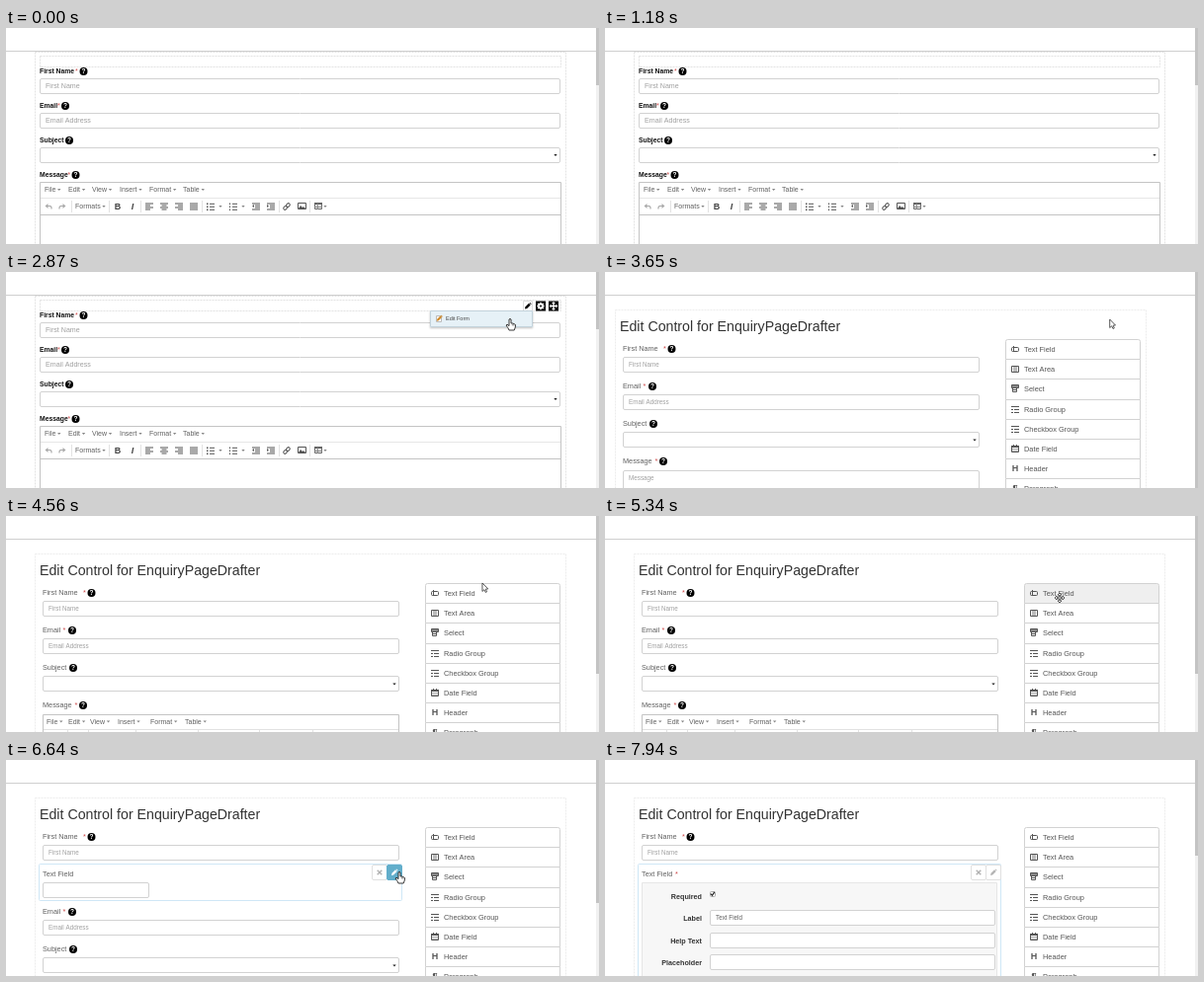
Write an HTML page with a canvas that moves like this. It is 600 px wide and 219 px high and loops after 8 s.

```html
<!DOCTYPE html>
<html lang="en">
<head>
<meta charset="utf-8">
<title>Form editor</title>
<style>
html, body { margin: 0; width: 100%; height: 100%; overflow: hidden; background: #fff; }
canvas { display: block; width: 600px; height: 219px; }
</style>
</head>
<body>
<canvas id="stage" width="600" height="219"></canvas>
<script>
const ctx = document.getElementById('stage').getContext('2d');
const LOOP = 8000, STEP = 130;
const FONT = '"Liberation Sans", Arial, sans-serif';
const TEXT = '#606060', HINT = '#a0a0a0', EDGE = '#d2d2d2', RED = '#c44';

// Moments at which the interface changes state.
const AT = {
  tools: 1430, menu: 2340, editor: 3250, settled: 4030, grab: 4820,
  drag: 5440, drop: 5860, hover: 6370, panel: 6760, checked: 7540, leave: 7670
};
// Pointer path: time, x, y.
const PATH = [
  [1300, 470, 120], [1950, 533, 34], [2150, 533, 34], [2340, 529, 36],
  [2730, 510, 48], [4150, 511, 48], [4900, 460, 83], [5400, 460, 83],
  [5860, 200, 112], [5990, 200, 112], [6500, 398, 114], [6850, 398, 114],
  [7450, 108, 135], [7670, 108, 135]
];

function text(str, x, y, size, color = TEXT, weight = 'normal', align = 'left') {
  ctx.font = `${weight} ${size}px ${FONT}`;
  ctx.textAlign = align;
  ctx.textBaseline = 'alphabetic';
  ctx.fillStyle = color;
  ctx.fillText(str, x, y + size * 0.35);
}

function fill(x, y, w, h, color) {
  ctx.fillStyle = color;
  ctx.fillRect(x, y, w, h);
}

function box(x, y, w, h, stroke = EDGE, back = '#fff', radius = 1.5) {
  ctx.beginPath();
  ctx.roundRect(x + 0.5, y + 0.5, w, h, radius);
  if (back) { ctx.fillStyle = back; ctx.fill(); }
  ctx.strokeStyle = stroke;
  ctx.lineWidth = 1;
  ctx.stroke();
}

function trace(points) {
  ctx.beginPath();
  points.forEach(([x, y], i) => i ? ctx.lineTo(x, y) : ctx.moveTo(x, y));
}

function line(points, color = '#555', width = 1) {
  trace(points);
  ctx.strokeStyle = color;
  ctx.lineWidth = width;
  ctx.stroke();
}

function shape(points, color, outline) {
  trace(points);
  ctx.closePath();
  ctx.fillStyle = color;
  ctx.fill();
  if (outline) {
    ctx.strokeStyle = outline;
    ctx.lineWidth = 0.9;
    ctx.stroke();
  }
}

function at(x, y, draw) {
  ctx.save();
  ctx.translate(x, y);
  draw();
  ctx.restore();
}

function dashed(x, y, w, h, color) {
  ctx.save();
  ctx.setLineDash([2, 1]);
  ctx.strokeStyle = color;
  ctx.lineWidth = 1;
  ctx.strokeRect(x + 0.5, y + 0.5, w, h);
  ctx.restore();
}

function help(x, y) {
  ctx.beginPath();
  ctx.arc(x, y, 4, 0, Math.PI * 2);
  ctx.fillStyle = '#000';
  ctx.fill();
  text('?', x, y, 6.5, '#fff', 'bold', 'center');
}

function caret(x, y, color = '#888') {
  shape([[x - 1.7, y - 1], [x + 1.7, y - 1], [x, y + 1]], color);
}

function pencil(x, y, color, s = 1) {
  at(x, y, () => {
    ctx.scale(s, s);
    shape([[-3, 3], [-2.5, 0.8], [1, -2.7], [2.7, -1], [-0.8, 2.5]], color);
    shape([[1.5, -3.1], [2.2, -3.6], [3.6, -2.2], [3.1, -1.5]], color);
  });
}

function cross(x, y, color) {
  line([[x - 2.3, y - 2.3], [x + 2.3, y + 2.3]], color, 1.4);
  line([[x + 2.3, y - 2.3], [x - 2.3, y + 2.3]], color, 1.4);
}

function fourArrows(color, r, outline) {
  for (let i = 0; i < 4; i++) {
    ctx.save();
    ctx.rotate(i * Math.PI / 2);
    shape([[-0.7, 0], [-0.7, 2 - r], [-2, 2 - r], [0, -r], [2, 2 - r], [0.7, 2 - r], [0.7, 0]], color, outline);
    ctx.restore();
  }
}

function gear() {
  for (let i = 0; i < 4; i++) {
    ctx.rotate(Math.PI / 4);
    fill(-0.8, -3.7, 1.6, 7.4, '#fff');
  }
  ctx.beginPath();
  ctx.arc(0, 0, 2.7, 0, Math.PI * 2);
  ctx.fill();
  ctx.beginPath();
  ctx.arc(0, 0, 1.1, 0, Math.PI * 2);
  ctx.fillStyle = '#000';
  ctx.fill();
}

function stripes(x, y, widths, align = 0, color = '#555') {
  const widest = Math.max(...widths);
  widths.forEach((w, i) =>
    fill(x - widest / 2 + (widest - w) * align, y - 3.5 + i * 2, w, 1, color));
}

function menuBar(y, xs) {
  ['File', 'Edit', 'View', 'Insert', 'Format', 'Table'].forEach((name, i) => {
    text(name, xs[i], y, 7);
    caret(xs[i] + ctx.measureText(name).width + 3.5, y);
  });
}

function toolbar(y) {
  for (const [x, dir] of [[43, 1], [57, -1]]) {
    at(x, y, () => {
      ctx.scale(dir, 1);
      shape([[-3.5, -0.5], [-0.5, -3], [-0.5, 2]], '#aaa');
      line([[-1, -0.5], [2, -0.5], [3, 1], [3, 2.5]], '#aaa', 1.2);
    });
  }
  for (const x of [66, 104, 136, 198, 276, 307]) fill(x, y - 6, 1, 12, '#e2e2e2');
  text('Formats', 70, y, 7);
  [99, 217, 240, 323].forEach(x => caret(x, y));
  text('B', 113, y, 9, '#444', 'bold', 'center');
  text('I', 128, y, 9, '#444', 'italic bold', 'center');
  [0, 0.5, 1].forEach((align, i) => stripes(145 + i * 15, y, [8, 5, 8, 5], align));
  stripes(190, y, [8, 8, 8, 8]);
  for (const x of [207, 230]) {
    for (let i = 0; i < 3; i++) {
      fill(x - 4, y - 3.5 + i * 3, x === 207 ? 1.5 : 1, 1.6, '#555');
      fill(x - 1, y - 3.2 + i * 3, 5, 1, '#555');
    }
  }
  [[253, -1], [268, 1]].forEach(([x, dir]) => {
    stripes(x, y, [8, 5, 5, 8], 1);
    shape([[x - 3 - dir, y - 2], [x - 3 + dir, y - 0.5], [x - 3 - dir, y + 1]], '#555');
  });
  at(284, y, () => {
    ctx.rotate(-Math.PI / 4);
    ctx.strokeStyle = '#555';
    ctx.lineWidth = 1;
    for (const x of [-4, 0]) {
      ctx.beginPath();
      ctx.roundRect(x, -1.5, 4, 3, 1.4);
      ctx.stroke();
    }
  });
  box(295, y - 4, 8, 6, '#555', null, 0);
  shape([[296, y + 2], [298, y - 1], [300, y + 1], [301, y], [303, y + 2]], '#555');
  box(312, y - 4, 7, 6, '#666', null, 0);
  fill(312, y - 4, 8, 2, '#666');
  fill(312, y, 8, 1, '#888');
  fill(315, y - 3, 1, 6, '#888');
}

function frame(t) {
  fill(0, 0, 600, 219, '#fff');
  fill(0, 23, 597, 1, '#cfcfcf');
  fill(597, 0, 3, 219, '#f1f1f1');
  // The thumb shrinks as the page grows.
  const thumb = t < AT.editor ? 58 : t < AT.settled ? 219 : t < AT.drop ? 160 : t < AT.panel ? 145 : 97;
  fill(597, 0, 3, thumb, '#c4c4c4');
}

function viewPage(t) {
  dashed(29, 24, 537, 220, '#e2e2e2');
  dashed(34, 28, 527, 11, '#e2e2e2');
  const fields = [
    ['First Name', 44, 70, 78.5, '*', 'First Name'],
    ['Email', 79, 52, 60, '*', 'Email Address'],
    ['Subject', 114, 0, 64, '', ''],
    ['Message', 149, 62.5, 70.5, '*', null]
  ];
  for (const [label, y, starX, helpX, star, hint] of fields) {
    text(label, 34, y, 6.8, '#111', 'bold');
    text(star, starX, y, 6.8, RED);
    help(helpX, y);
    if (hint === null) continue;
    box(34, y + 7, 526, 15);
    text(hint, 40, y + 15, 7.1, HINT);
  }
  caret(556, 129, '#222');
  box(34, 156, 527, 90, '#c4c4c4', '#fff', 0);
  fill(35, 172, 526, 1, '#e6e6e6');
  fill(35, 189, 526, 1, '#c4c4c4');
  menuBar(164, [39, 63, 87, 115, 145, 179]);
  toolbar(181);

  if (t >= AT.tools) {
    box(523, 29, 9, 10, '#ddd', '#fff', 0);
    pencil(528, 34.5, '#000');
    fill(536, 29.5, 10, 10, '#000');
    at(541, 34.5, gear);
    fill(549, 29.5, 10, 10, '#000');
    at(554, 34.5, () => fourArrows('#fff', 4.4));
  }
  if (t >= AT.menu) {
    ctx.save();
    ctx.shadowColor = 'rgba(0,0,0,.25)';
    ctx.shadowBlur = 2;
    ctx.shadowOffsetY = 1;
    fill(429, 39, 104, 17, '#e6f1f7');
    ctx.restore();
    box(429, 39, 103, 16, '#c3d3dc', '#e6f1f7', 0);
    box(435, 44, 5, 6, '#bbb', '#fff', 0);
    pencil(438.5, 47, '#d08a28', 0.9);
    text('Edit Form', 445, 47.2, 5.5, '#444');
  }
}

function sideIcon(kind, x, y) {
  const c = '#555';
  if (kind === 0) {
    box(x - 4, y - 2, 7, 4, c, null, 1);
    fill(x - 2, y - 3, 1, 6, c);
  } else if (kind === 1) {
    box(x - 4, y - 3, 7, 6, c, null, 0);
    [-1, 1, 3].forEach(d => fill(x - 2, y + d - 0.4, 4, 0.8, c));
  } else if (kind === 2) {
    box(x - 4, y - 4, 7, 3, c, '#888', 0);
    box(x - 3, y - 1, 4, 4, c, null, 0);
    fill(x - 2, y + 1, 3, 1, c);
  } else if (kind < 5) {
    [-3, 0, 3].forEach((d, i) => {
      fill(x - 4, y + d, 2, 1, c);
      fill(x - (i ? 1 : 2), y + d, i ? 5 : 6, 1, c);
    });
  } else if (kind === 5) {
    box(x - 4, y - 3, 7, 6, c, null, 0);
    fill(x - 4, y - 3, 8, 2, c);
    fill(x - 2, y - 4, 1, 2, c);
    fill(x + 1, y - 4, 1, 2, c);
    for (let i = 0; i < 6; i++) fill(x - 2.5 + i % 3 * 2, y + (i > 2 ? 1.8 : 0), 1, 1, c);
  } else {
    text(kind === 6 ? 'H' : '¶', x, y, 9, c, 'bold', 'center');
  }
}

const ITEMS = ['Text Field', 'Text Area', 'Select', 'Radio Group',
  'Checkbox Group', 'Date Field', 'Header', 'Paragraph'];
const itemTop = i => Math.round(68 + i * 20.2);

function sidebarItem(i, x, y, back = '#fff') {
  box(x, y, 136, itemTop(i + 1) - itemTop(i), EDGE, back, i ? 0 : [2, 2, 0, 0]);
  sideIcon(i, x + 10, y + 10);
  text(ITEMS[i], x + 19, y + 10.2, 7.4, '#555');
}

function fieldLabel(label, y, starX, helpX) {
  text(label, 37, y, 7.3);
  if (starX) text('*', starX, y, 7.3, RED);
  help(helpX, y + 0.5);
}

function input(x, y, w, hint = '', color = HINT) {
  box(x, y, w, 15);
  text(hint, x + 6, y + 8.2, 6.3, color);
}

function fieldBlock(t) {
  const open = t >= AT.panel;
  box(33, 105, 367, open ? 140 : 37, '#cfe7f6', '#fff', 1);
  text('Text Field', 37, 115, 7.3);
  if (t >= AT.checked) text('*', 71, 115, 7.3, RED);
  const hot = t >= AT.hover && t < AT.panel + STEP;
  box(370, 106, 15, 15, '#e0e0e0');
  cross(378, 114, '#b0b0b0');
  box(385, 106, 15, 15, hot ? '#62aecb' : '#e0e0e0', hot ? '#62aecb' : '#fff');
  pencil(393, 114, hot ? '#fff' : '#b5b5b5');
  if (!open) {
    input(37, 124, 107);
    return;
  }
  box(37, 124, 359, 110, '#e6e6e6', '#f7f7f7', 0);
  [['Required', 138], ['Label', 160], ['Help Text', 183], ['Placeholder', 205.5]].forEach(([name, y], i) => {
    text(name, 98, y, 7.2, '#333', 'bold', 'right');
    if (i) input(106, Math.round(y - 8.5), 288, i === 1 ? 'Text Field' : '', TEXT);
  });
  box(106, 133, 5, 5, '#aaa', '#fff', 1);
  if (t >= AT.checked) line([[107, 135.7], [108.4, 137.3], [110.8, 133.8]], '#222', 1.2);
}

function editPage(t, pointer) {
  const dropped = t >= AT.drop;
  const dragging = t >= AT.drag && !dropped;
  const settled = t >= AT.settled;
  ctx.save();
  if (!settled) ctx.translate(-19, 0);
  dashed(29, 38, 537, 230, '#ececec');
  text('Edit Control for EnquiryPageDrafter', 34, 55.5, 14.2, '#333');

  fieldLabel('First Name', 77.5, 78, 86.5);
  input(37, 86, 360, 'First Name');
  const down = dropped || (dragging && pointer.x < 397) ? 38 : 0;
  if (t < AT.panel) {
    fieldLabel('Email', 115.5 + down, 57.5, 67);
    input(37, 124 + down, 360, 'Email Address');
    fieldLabel('Subject', 153.5 + down, 0, 68);
    input(37, 162 + down, 360);
    caret(393, 170.5 + down, '#222');
    fieldLabel('Message', 191.5 + down, 69.5, 78);
    if (settled) {
      box(37, 201 + down, 360, 90, '#c4c4c4', '#fff', 0);
      menuBar(208.5 + down, [41, 63, 85, 113, 146, 181]);
      fill(38, 216 + down, 359, 1, '#e2e2e2');
      for (const x of [62, 83, 131, 194, 256, 310]) fill(x, 217 + down, 1, 3, '#e2e2e2');
    } else {
      box(37, 201, 360, 40);
      text('Message', 43, 209, 6.3, HINT);
    }
  }
  if (dropped) fieldBlock(t);

  const hovering = t >= AT.grab && t < AT.drag;
  ITEMS.forEach((_, i) =>
    sidebarItem(i, 424, itemTop(i), i === 0 && hovering ? '#efefef' : '#fff'));
  if (dragging) sidebarItem(0, pointer.x - 36, pointer.y - 15, '#efefef');
  ctx.restore();
}

function pointerAt(t) {
  if (t < PATH[0][0] || t >= AT.leave) return null;
  const i = PATH.findIndex(p => p[0] > t);
  const [t0, x0, y0] = PATH[i - 1], [t1, x1, y1] = PATH[i];
  const k = (t - t0) / (t1 - t0), e = k * k * (3 - 2 * k);
  return { x: x0 + (x1 - x0) * e, y: y0 + (y1 - y0) * e };
}

function drawPointer(t, { x, y }) {
  const overTools = t >= 1820 && t < AT.editor;
  const overButton = t >= AT.hover && t < AT.panel + STEP;
  at(x, y, () => {
    if (overTools || overButton) {
      shape([[-1, 0], [0, -0.6], [1, 0], [1, 4], [2.5, 4], [4.5, 4.8], [5.5, 5.5],
        [5.3, 8], [4.2, 11], [-1, 11], [-2.2, 8.5], [-4, 6], [-3, 5.2], [-1, 6.6]], '#fff', '#222');
      line([[2.3, 4.5], [2.3, 6.5]], '#444', 0.6);
      line([[3.8, 5], [3.8, 6.7]], '#444', 0.6);
    } else if (t >= AT.grab && t < AT.drop + STEP) {
      fourArrows('#fff', 5, '#444');
      fill(-0.7, -0.7, 1.4, 1.4, '#fff');
    } else {
      shape([[0, 0], [0, 8.5], [2, 6.8], [3.3, 9.5], [4.6, 8.9], [3.4, 6.2], [5.8, 6]], '#fff', '#444');
    }
  });
}

function render(now) {
  const elapsed = now % LOOP;
  const t = Math.max(0, Math.floor((elapsed - 10) / STEP) * STEP + 10);
  const pointer = pointerAt(t);
  frame(t);
  if (t < AT.editor) viewPage(t);
  else editPage(t, pointer);
  if (pointer) drawPointer(t, pointer);
}

const start = performance.now();
function tick() {
  render(performance.now() - start);
  requestAnimationFrame(tick);
}
tick();
</script>
</body>
</html>
```
